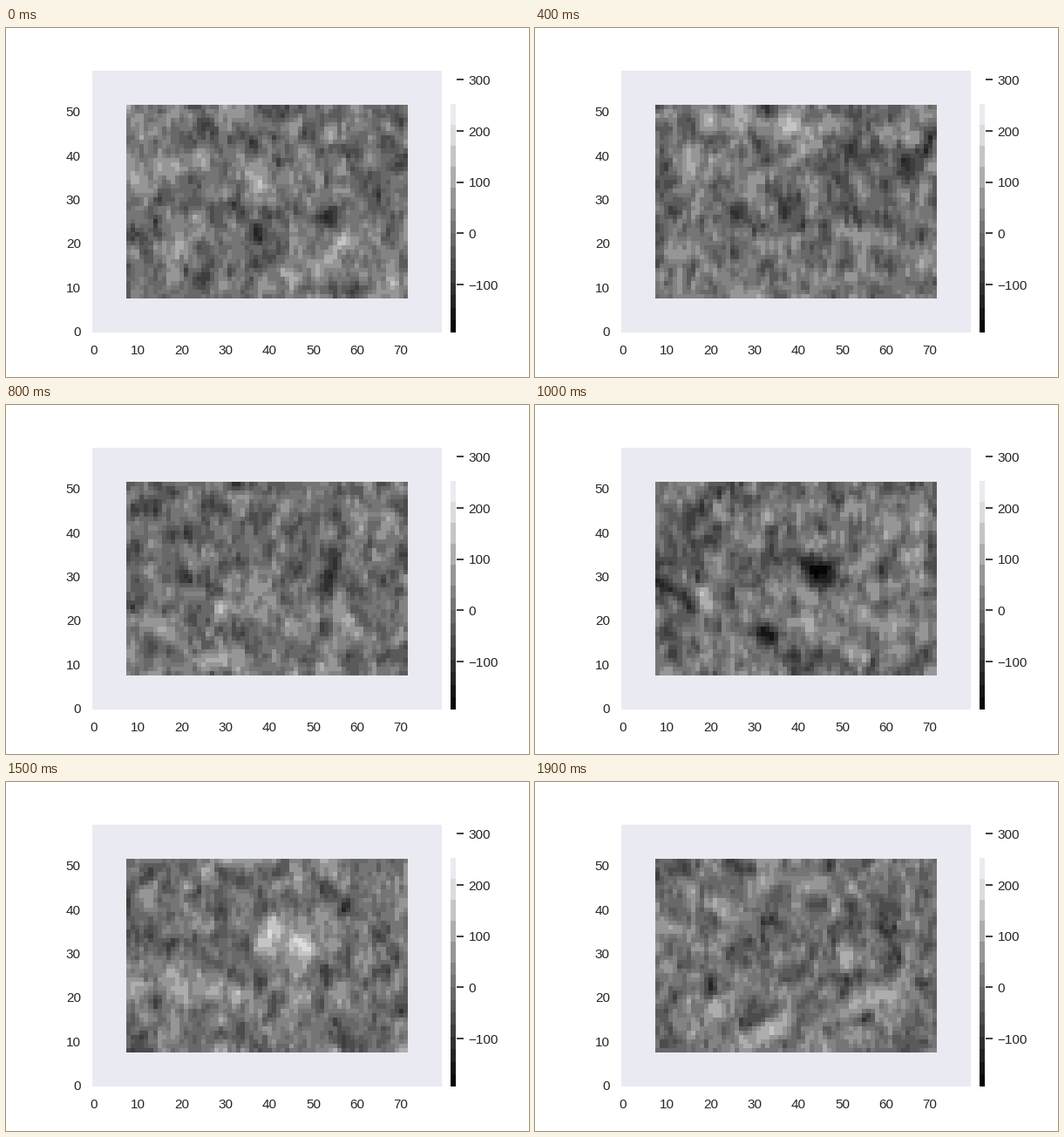
Animation, 600 px wide and 400 px high, one loop 2000 ms. Source, as a matplotlib script:

```python
import matplotlib.pyplot as plt
import numpy as np
from matplotlib.animation import FuncAnimation
from matplotlib.colors import BoundaryNorm, ListedColormap

W, H, DPI = 600, 400, 100
FRAMES, STEP = 20, 100
COLS, ROWS, MARGIN = 64, 44, 8
LOW, HIGH, TOP = -193.4, 253, 317.7
PALE, INK = "#eaeaf2", "#262626"

plt.rcParams.update({"font.family": "Liberation Sans", "font.size": 11})

# Grey bands: finer in the dark half, coarser in the bright half.
edges = np.r_[np.linspace(LOW, 48.5, 11), np.linspace(48.5, HIGH, 6)[1:]]
mids = (edges[:-1] + edges[1:]) / 2
greys = [str(g) for g in (mids - LOW) / (HIGH - LOW)]
cmap = ListedColormap(greys[:-1] + [PALE])
cmap.set_over(PALE)
cmap.set_under("black")
norm = BoundaryNorm(edges, cmap.N)


def bell(x, width):
    return np.exp(-0.5 * (x / width) ** 2)


def noise(rng, widths):
    """Unit-variance noise smoothed along time, rows and columns."""
    pad = 6
    field = rng.normal(size=(FRAMES + 2 * pad, ROWS + 2 * pad, COLS + 2 * pad))
    for axis, width in enumerate(widths):
        kernel = bell(np.arange(-pad, pad + 1), width)
        field = np.apply_along_axis(np.convolve, axis, field, kernel, "valid")
    return field / field.std()


def response(t, x, y):
    """Slanted central patch that turns dark, then flashes bright."""
    dx, dy, tilt = x - 43, y - 32.5, np.radians(-24)
    along = dx * np.cos(tilt) + dy * np.sin(tilt)
    across = dy * np.cos(tilt) - dx * np.sin(tilt)
    bright = 215 * bell(t - 16, 1.3) * bell(along, 5.5) * bell(across, 3.6)
    dark = 130 * bell(t - 10, 1.9) * bell(along, 4.5) * bell(across, 2.4)
    return bright - dark


def make_movie():
    rng = np.random.default_rng(12)
    movie = 5 + 34 * noise(rng, (0.8, 1.6, 1.4)) + 22 * noise(rng, (0.5, 0.8, 0.5))
    t = np.arange(FRAMES)[:, None, None]
    y = np.arange(ROWS)[None, :, None] + MARGIN
    x = np.arange(COLS)[None, None, :] + MARGIN
    movie += response(t, x, y)
    # Lasting spots: column, row, height
    for cx, cy, height in [(53.5, 26, -70), (55.5, 20.5, 60), (43, 46, 50)]:
        movie += height * bell(x - cx, 1.8) * bell(y - cy, 1.8)
    return movie


def pixel_axes(fig, left, top, width, height):
    ax = fig.add_axes([left / W, 1 - (top + height) / H, width / W, height / H])
    ax.spines[:].set_visible(False)
    ax.tick_params(length=6, width=1.25, pad=3.5, color=INK, labelcolor=INK)
    return ax


movie = make_movie()
fig = plt.figure(figsize=(W / DPI, H / DPI), dpi=DPI, facecolor="white")

ax = pixel_axes(fig, 99, 49, 401, 300)
ax.set_facecolor(PALE)
mesh = ax.pcolormesh(np.arange(COLS + 1) + MARGIN - 0.5,
                     np.arange(ROWS + 1) + MARGIN - 0.5,
                     movie[0], cmap=cmap, norm=norm)
ax.set(xlim=(-0.3, 79.3), ylim=(-0.23, 59.23),
       xticks=range(0, 80, 10), yticks=range(0, 60, 10))
ax.tick_params(bottom=False, left=False)
ax.tick_params(axis="x", pad=4)

bar = pixel_axes(fig, 510, 49, 7.2, 300)
bar.set_facecolor("white")
bar.pcolormesh([0, 6], edges, mids[:, None], cmap=cmap, norm=norm)
bar.set(xlim=(0, 7.2), ylim=(LOW, TOP), xticks=[],
        yticks=range(-100, 301, 100))
bar.yaxis.tick_right()


def update(i):
    mesh.set_array(movie[i])
    return [mesh]


anim = FuncAnimation(fig, update, frames=FRAMES, interval=STEP,
                     repeat=True, repeat_delay=0, blit=False)
plt.show()
```
